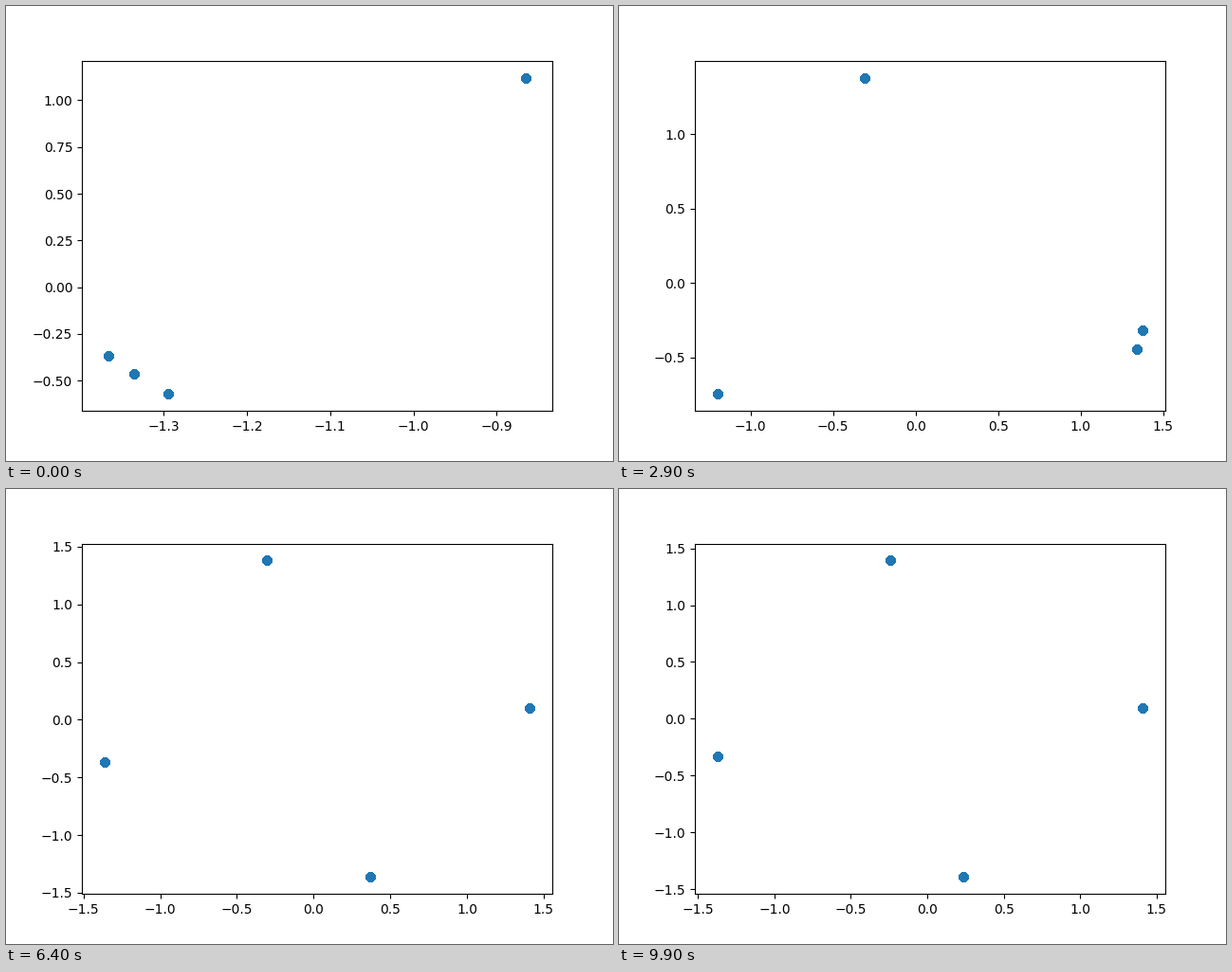
Write a matplotlib script that moves like this. It is 640 by 480 pixels and loops after 10 s.

```python
import numpy as np
import matplotlib.pyplot as plt
from matplotlib.animation import FuncAnimation

plt.rcParams["text.kerning_factor"] = 6  # whole-pixel glyph spacing

FRAMES = 100
RADIUS = np.sqrt(2)
SAMPLES = 200  # coincident samples give each dot its hard edge

# Key poses of the four points on the circle, in degrees
KEYS = np.array([0, 19, 39, 53, 64, 84, 99])
POSES = np.array([
    [127.71, 112.3, 96.74, 100.67, 102.4, 99.83, 99.83],
    [194.96, 208.7, 213.2, 202.0, 195.1, 193.6, 193.6],
    [199.22, 344.0, 336.0, 288.7, 285.2, 280.1, 279.6],
    [203.73, 345.06, 348.7, 360.0, 364.07, 363.8, 363.8],
])


def glide(keys, values, t):
    """Monotone cubic path: eases at turning points, never overshoots."""
    step = np.diff(keys)
    rate = np.diff(values) / step
    a, b = rate[:-1], rate[1:]
    inner = np.divide(2 * a * b, a + b, out=np.zeros_like(a), where=a * b > 0)
    slope = np.r_[rate[0], inner, rate[-1]]
    i = np.clip(np.searchsorted(keys, t, side="right") - 1, 0, len(step) - 1)
    s = (t - keys[i]) / step[i]
    ease = s * s * (3 - 2 * s)
    bend = s * (1 - s) * ((1 - s) * slope[i] - s * slope[i + 1])
    return values[i] + ease * (values[i + 1] - values[i]) + step[i] * bend


def limits(values, pad):
    lo, hi = values.min() - pad, values.max() + pad
    margin = 0.05 * (hi - lo)
    return lo - margin, hi + margin


angles = np.radians([glide(KEYS, row, np.arange(FRAMES)) for row in POSES])
xs, ys = RADIUS * np.cos(angles), RADIUS * np.sin(angles)

fig, ax = plt.subplots(figsize=(6.4, 4.8), dpi=100)
pad_x, pad_y = 3 / ax.bbox.width, 3 / ax.bbox.height
dots = ax.scatter([], [], color="C0")


def update(i):
    x, y = xs[:, i], ys[:, i]
    dots.set_offsets(np.tile(np.column_stack([x, y]), (SAMPLES, 1)))
    ax.set_xlim(limits(x, pad_x))
    ax.set_ylim(limits(y, pad_y))
    return [dots]


anim = FuncAnimation(fig, update, frames=FRAMES, interval=100, repeat=True,
                     repeat_delay=0, blit=False)
plt.show()
```
